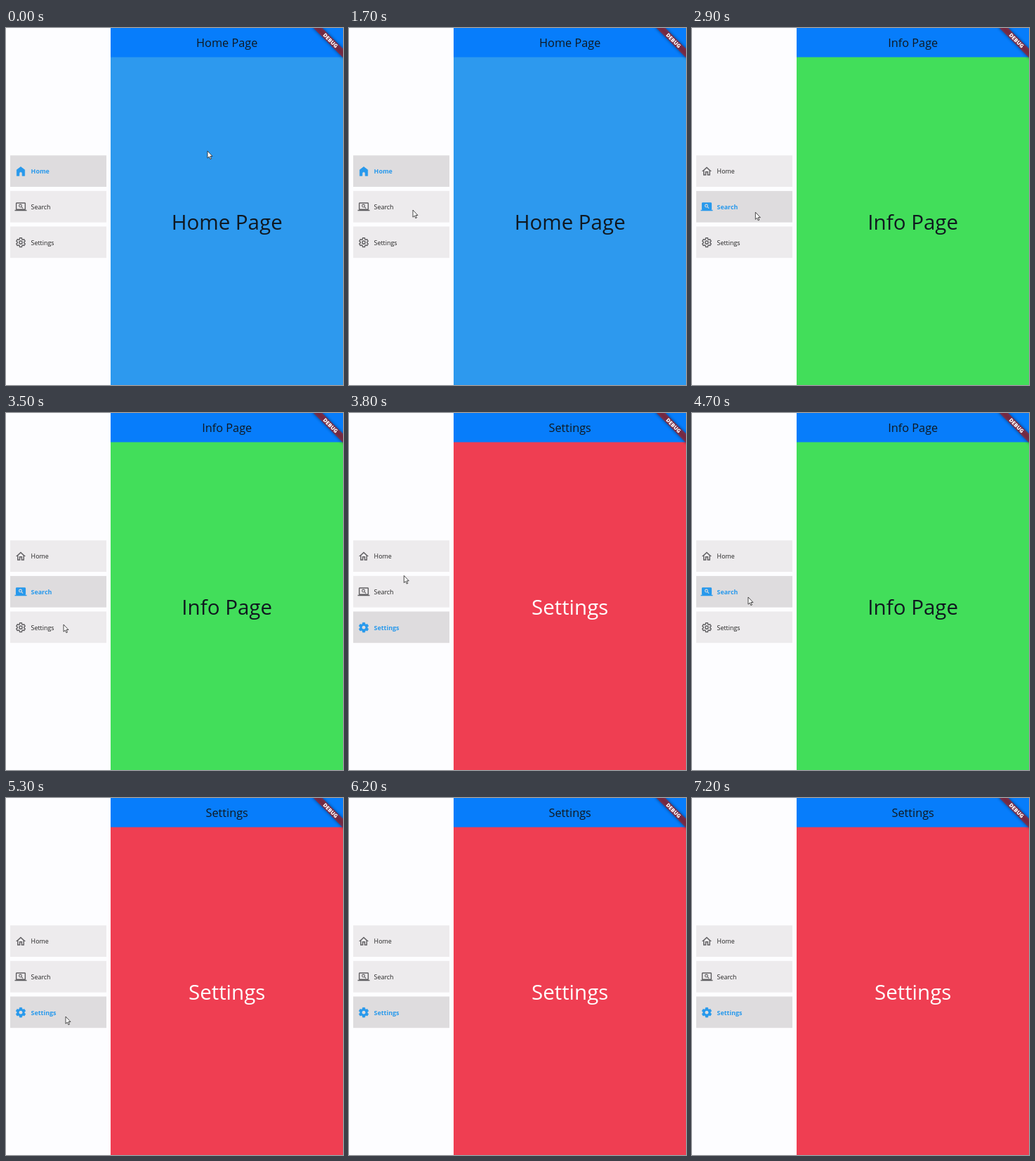
These frames come from a looping animation (480x508 px, 7300 ms). An HTML page:

```html
<!DOCTYPE html>
<html lang="en">
<head>
<meta charset="utf-8">
<title>Side menu</title>
<style>
  html, body { margin: 0; width: 100%; height: 100%; overflow: hidden; background: #fdfdff; }
  svg { display: block; width: 480px; height: 508px; }
  text { font-family: "Open Sans", "Noto Sans", sans-serif; }
  .mid { text-anchor: middle; fill: #101820; }
  #heading { font-size: 16.3px; }
  #body { font-size: 29.5px; }
  .tile rect { fill: #edebed; }
  .tile text { font-size: 8.9px; fill: #222; }
  .icon { fill: #616063; color: #616063; }
  .tile .on { display: none; }
  .tile.active rect { fill: #dedcde; }
  .tile.active text { fill: #2899ec; font-weight: 700; }
  .tile.active .icon { fill: #2899ec; color: #2899ec; }
  .tile.active .on { display: inline; }
  .tile.active .off { display: none; }
  .line { fill: none; stroke: currentColor; stroke-width: 2; }
  .banner { font-size: 7.6px; font-weight: 800; fill: #fff; text-anchor: middle; }
</style>
</head>
<body>
<svg viewBox="0 0 480 508">
  <defs>
    <filter id="blur" x="-20%" y="-100%" width="140%" height="300%"><feGaussianBlur stdDeviation="2"/></filter>
  </defs>
  <rect width="480" height="508" fill="#fdfdff"/>
  <rect id="page" x="149" y="41" width="331" height="467"/>
  <rect x="149" width="331" height="41.5" fill="#077dfb"/>
  <text id="heading" class="mid" x="314.7" y="27.4"></text>
  <text id="body" class="mid" x="314.7" y="287.3"></text>
  <g id="menu"></g>
  <g transform="translate(480 0) rotate(45)">
    <rect x="-32" y="20.9" width="64" height="8.9" opacity=".5" filter="url(#blur)"/>
    <rect x="-32" y="20.9" width="64" height="8.9" fill="#b71c1c" fill-opacity=".63"/>
    <text class="banner" y="28">DEBUG</text>
  </g>
  <path id="cursor" d="M0 0V10.2L2.3 8.1L3.9 11.7L5.5 11L3.9 7.5H7Z"
        fill="#fff" stroke="#222" stroke-width=".8" stroke-linejoin="round"/>
</svg>
<script>
const LOOP = 7300, STEP = 100;
const $ = id => document.getElementById(id);

const pages = [
  { label: "Home", title: "Home Page", color: "#2d99ee", ink: "#101820" },
  { label: "Search", title: "Info Page", color: "#42de5a", ink: "#101820" },
  { label: "Settings", title: "Settings", color: "#ef3e52", ink: "#fff" }
];

// [time, page index]
const clicks = [[0, 0], [2800, 1], [3600, 2], [4000, 0], [4600, 1], [5200, 2]];

// [time, x, y]
const moves = [
  [0, 287, 175], [300, 287, 175], [1200, 91, 259], [2800, 91, 259],
  [3400, 82, 301], [3600, 82, 301], [3900, 77, 207], [4100, 77, 207],
  [4500, 80, 262], [4700, 80, 262], [5100, 85, 311], [5300, 85, 311],
  [5600, 490, 150], [LOOP, 490, 150]
];

// Gear outline in the 24-unit icon grid, six teeth
function gear(scale) {
  const tooth = [[-2.87, -6.93], [-2.3, -10], [2.3, -10], [2.87, -6.93]];
  const points = [];
  for (let i = 0; i < 6; i++) {
    const c = Math.cos(i * Math.PI / 3) * scale, s = Math.sin(i * Math.PI / 3) * scale;
    for (const [x, y] of tooth)
      points.push((12 + x * c - y * s).toFixed(2) + " " + (12 + x * s + y * c).toFixed(2));
  }
  return "M" + points.join("L") + "Z";
}

const laptop = "M20 18c1.1 0 2-.9 2-2V5c0-1.1-.9-2-2-2H4c-1.1 0-2 .9-2 2v11c0 1.1.9 2 2 2H0v2h24v-2z";
const lens = color =>
  `<g fill="none" stroke="${color}" stroke-width="1.5"><circle cx="11.3" cy="9.8" r="2.7"/><path d="M13.3 11.8l3 3"/></g>`;

const icons = [
  {
    off: `<path d="M12 5.69l5 4.5V18h-2v-6H9v6H7v-7.81l5-4.5M12 3L2 12h3v8h6v-6h2v6h6v-8h3z"/>`,
    on: `<path d="M12 3L4 9v12h5v-5a3 3 0 0 1 6 0v5h5V9z" stroke="currentColor" stroke-linejoin="round"/>`
  },
  {
    off: `<path fill-rule="evenodd" d="${laptop}M4 5h16v11H4z"/>` + lens("currentColor"),
    on: `<path d="${laptop}"/>` + lens("#dedcde")
  },
  {
    off: `<path class="line" stroke-linejoin="round" d="${gear(.9)}"/><circle class="line" cx="12" cy="12" r="3"/>`,
    on: `<path stroke="currentColor" stroke-linejoin="round" d="${gear(.97)}"/><circle cx="12" cy="12" r="3.4" fill="#dedcde"/>`
  }
];

$("menu").innerHTML = pages.map((p, i) => `
  <g class="tile" transform="translate(6 ${181.3 + i * 50.6})">
    <rect width="137" height="44.7"/>
    <g class="icon" transform="translate(6.5 14.2) scale(.708)">
      <g class="off">${icons[i].off}</g><g class="on">${icons[i].on}</g>
    </g>
    <text x="29.6" y="26.2">${p.label}</text>
  </g>`).join("");
const tiles = [...document.querySelectorAll(".tile")];

const ease = u => u * u * (3 - 2 * u);

function cursorAt(t) {
  const i = moves.findIndex(m => m[0] > t);
  const [t0, x0, y0] = moves[i - 1], [t1, x1, y1] = moves[i];
  const u = ease((t - t0) / (t1 - t0));
  return [x0 + (x1 - x0) * u, y0 + (y1 - y0) * u];
}

let shown = -1;
function showPage(n) {
  if (n === shown) return;
  shown = n;
  const p = pages[n];
  $("page").setAttribute("fill", p.color);
  $("heading").textContent = $("body").textContent = p.title;
  $("body").style.fill = p.ink;
  tiles.forEach((tile, i) => tile.classList.toggle("active", i === n));
}

const start = performance.now();
function draw() {
  const elapsed = Math.max(0, performance.now() - start) % LOOP;
  const t = Math.floor(elapsed / STEP) * STEP;
  showPage(clicks.filter(c => c[0] <= t).pop()[1]);
  $("cursor").setAttribute("transform", `translate(${cursorAt(t).join(" ")})`);
  requestAnimationFrame(draw);
}
draw();
</script>
</body>
</html>
```
